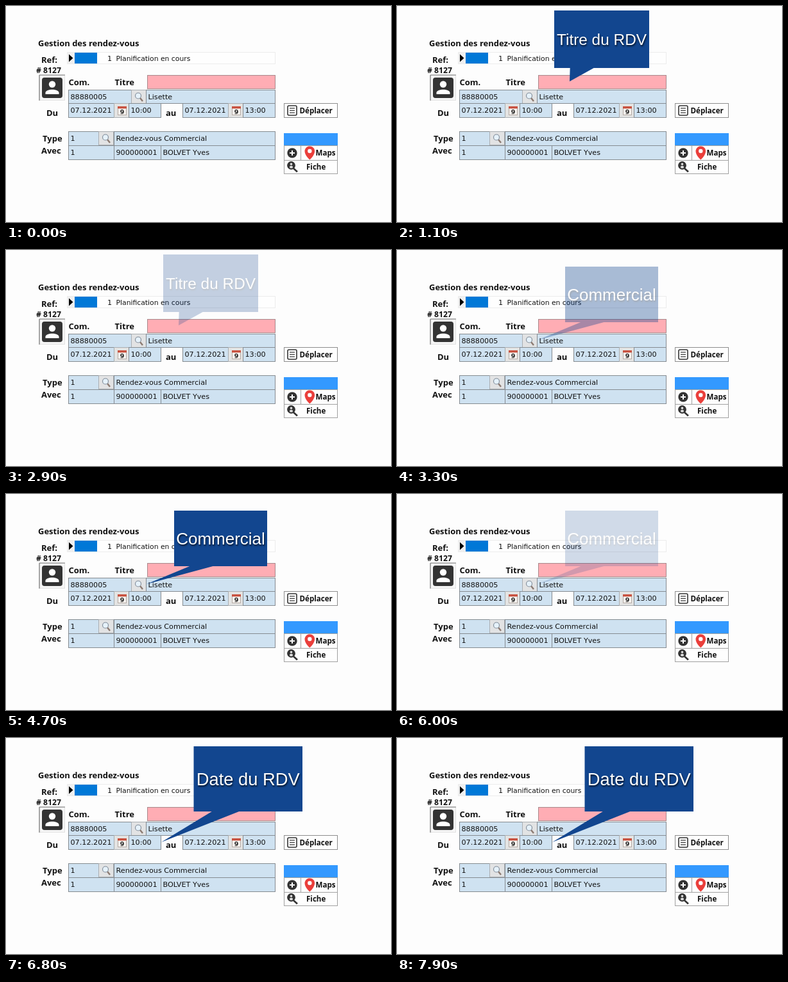
Recreate the animation shown at these times as an HTML page with a canvas. Size 600 by 338 pixels, loop 8000 ms.

```html
<!DOCTYPE html>
<html lang="fr">
<head>
<meta charset="utf-8">
<style>
  html, body { margin: 0; width: 100%; height: 100%; overflow: hidden; background: #fdfdfd; }
  canvas { display: block; }
</style>
</head>
<body>
<canvas id="stage" width="600" height="338"></canvas>
<script>
const W = 600, H = 338, LOOP = 8000, FADE = 700;
const FIELD_FONT = '11.2px "DejaVu Sans", sans-serif';
const LABEL_FONT = 'bold 13px "Open Sans", sans-serif';
const BUTTON_FONT = 'bold 11.6px "Open Sans", sans-serif';
const DARK = '#333333', EDGE = '#858b90', FIELD = '#cfe2f1';

// Each callout: box, pointer tip, text size, start of fade-in and of fade-out.
const callouts = [
  { text: 'Titre du RDV', size: 24.4, box: [245, 7, 148, 90], tip: [269, 118], show: 50, hide: 2370 },
  { text: 'Commercial', size: 26, box: [262, 26, 145, 87], tip: [219, 141], show: 3050, hide: 5430 },
  { text: 'Date du RDV', size: 27.3, box: [292.5, 13, 169.5, 102], tip: [242, 163], show: 6100, hide: LOOP }
];

function layer() {
  const canvas = document.createElement('canvas');
  canvas.width = W;
  canvas.height = H;
  return canvas;
}

function rect(c, x, y, w, h, fill, stroke) {
  c.fillStyle = fill;
  c.fillRect(x, y, w, h);
  if (stroke) {
    c.lineWidth = 1;
    c.strokeStyle = stroke;
    c.strokeRect(x + 0.5, y + 0.5, w - 1, h - 1);
  }
}

function polygon(c, points, fill) {
  c.beginPath();
  points.forEach(([x, y]) => c.lineTo(x, y));
  c.closePath();
  c.fillStyle = fill;
  c.fill();
}

function disc(c, x, y, r, fill) {
  c.beginPath();
  c.arc(x, y, r, 0, Math.PI * 2);
  c.fillStyle = fill;
  c.fill();
}

function line(c, x1, y1, x2, y2, width, color) {
  c.beginPath();
  c.moveTo(x1, y1);
  c.lineTo(x2, y2);
  c.lineWidth = width;
  c.strokeStyle = color;
  c.stroke();
}

function text(c, value, x, y, font = FIELD_FONT, color = '#111') {
  c.font = font;
  c.fillStyle = color;
  c.fillText(value, x, y);
}

function field(c, x, y, w, h, value) {
  rect(c, x, y, w, h, FIELD, EDGE);
  text(c, value, x + 3.5, y + h / 2 + 3.5);
}

function searchButton(c, x, y) {
  rect(c, x, y, 24, 22, '#e2e3e4', '#a9aeb2');
  line(c, x + 14, y + 13, x + 18, y + 18, 2.4, '#8c7a72');
  disc(c, x + 11, y + 9.5, 5, '#7f8b98');
  disc(c, x + 11, y + 9.5, 3.9, '#e6f2fb');
}

function calendarButton(c, x, y) {
  rect(c, x, y, 24, 23, '#e4e4e3', '#a9aeb2');
  rect(c, x + 6, y + 5, 14, 14, '#f6f3ef', '#b4aaa5');
  rect(c, x + 6, y + 5, 14, 3.5, '#c8513f');
  text(c, '9', x + 9.8, y + 17, 'bold 9.5px "DejaVu Sans", sans-serif', '#222');
}

function drawPortrait(c) {
  rect(c, 52, 108, 40, 40, '#f6f6f6', '#e2e2e2');
  line(c, 52, 108, 92, 108, 1.2, '#777');
  line(c, 52, 108, 52, 148, 1.2, '#777');
  c.beginPath();
  c.roundRect(56, 112, 32, 32, 4);
  c.fillStyle = DARK;
  c.fill();
  disc(c, 72, 122.5, 5.2, '#fff');
  c.beginPath();
  c.moveTo(61.5, 138);
  c.lineTo(61.5, 135.5);
  c.bezierCurveTo(62, 129, 82, 129, 82.5, 135.5);
  c.lineTo(82.5, 138);
  c.closePath();
  c.fill();
}

function drawButtons(c) {
  rect(c, 433, 152, 84, 23, '#fefefe', '#8c8c8c');
  c.beginPath();
  c.roundRect(439, 156, 14, 15, 2);
  c.lineWidth = 1.6;
  c.strokeStyle = DARK;
  c.stroke();
  [160, 163.5, 167].forEach(y => line(c, 442, y, 450, y, 1.2, DARK));
  text(c, 'Déplacer', 457.5, 168, BUTTON_FONT);

  rect(c, 433, 199, 84, 20, '#3399ff');
  rect(c, 433, 218, 27, 24, '#fefefe', '#a0a0a0');
  rect(c, 459, 218, 58, 24, '#fefefe', '#a0a0a0');
  rect(c, 433, 241, 84, 22, '#fefefe', '#a0a0a0');

  disc(c, 446, 230, 7.7, DARK);
  line(c, 442, 230, 450, 230, 2, '#fff');
  line(c, 446, 226, 446, 234, 2, '#fff');

  c.beginPath();
  c.arc(473.3, 227.2, 7.8, Math.PI * 0.93, Math.PI * 0.07);
  c.quadraticCurveTo(479.5, 235, 473.3, 240.5);
  c.quadraticCurveTo(467, 235, 465.6, 228.8);
  c.fillStyle = '#ea3f3b';
  c.fill();
  disc(c, 473.3, 227, 3.2, '#fff');
  text(c, 'Maps', 482.5, 234, BUTTON_FONT);

  line(c, 448, 254, 454, 259.5, 2.6, DARK);
  disc(c, 444.5, 249.5, 6.4, DARK);
  disc(c, 444.5, 247.4, 1.8, '#ddd');
  c.beginPath();
  c.ellipse(444.5, 252, 2.6, 2, 0, 0, Math.PI * 2);
  c.fillStyle = '#ddd';
  c.fill();
  text(c, 'Fiche', 468, 256, BUTTON_FONT);
}

function drawForm() {
  const canvas = layer(), c = canvas.getContext('2d');
  rect(c, 0, 0, W, H, '#fdfdfd');

  [['Gestion des rendez-vous', 50, 63], ['Ref:', 55, 88.5], ['Com.', 97.5, 124],
   ['Titre', 169.5, 124], ['Du', 63, 172], ['au', 249, 172],
   ['Type', 57, 212], ['Avec', 55, 231]
  ].forEach(([value, x, y]) => text(c, value, x, y, LABEL_FONT));
  text(c, '# 8127', 47, 105, 'bold 12.2px "Open Sans", sans-serif');

  rect(c, 95, 72, 325, 19, '#fefefe', '#ececec');
  rect(c, 96, 73, 11, 17, '#f0f0f0');
  polygon(c, [[98, 75.5], [104.5, 81.5], [98, 87.5]], '#000');
  rect(c, 107, 73, 35, 17, '#0078d7');
  text(c, '1', 158, 86);
  text(c, 'Planification en cours', 171.5, 86, '10.8px "DejaVu Sans", sans-serif');

  drawPortrait(c);

  rect(c, 220, 108, 200, 22, '#ffadb4', '#a8888b');
  field(c, 97, 131, 99, 22, '88880005');
  searchButton(c, 195, 131);
  field(c, 218, 131, 202, 22, 'Lisette');
  field(c, 97, 152, 72, 23, '07.12.2021');
  calendarButton(c, 168, 152);
  field(c, 191, 152, 51, 23, '10:00');
  field(c, 275, 152, 72, 23, '07.12.2021');
  calendarButton(c, 346, 152);
  field(c, 369, 152, 51, 23, '13:00');

  field(c, 97, 196, 48, 23, '1');
  searchButton(c, 144, 196);
  field(c, 168, 196, 252, 23, 'Rendez-vous Commercial');
  field(c, 97, 218, 72, 23, '1');
  field(c, 168, 218, 74, 23, '900000001');
  field(c, 241, 218, 179, 23, 'BOLVET Yves');

  drawButtons(c);
  return canvas;
}

function drawCallout({ text: label, size, box: [x, y, w, h], tip }) {
  const canvas = layer(), c = canvas.getContext('2d');
  const bottom = y + h;
  polygon(c, [[x, y], [x + w, y], [x + w, bottom], [x + w * 5 / 12, bottom],
    tip, [x + w / 6, bottom], [x, bottom]], '#12468f');
  c.textAlign = 'center';
  c.shadowColor = 'rgba(0,0,0,0.75)';
  c.shadowBlur = 2.5;
  c.shadowOffsetX = 1;
  c.shadowOffsetY = 2;
  text(c, label, x + w / 2, y + h / 2 + size * 0.36,
    `${size}px "Liberation Sans", Arial, sans-serif`, '#fff');
  return canvas;
}

const fade = (t, start) => Math.min(1, Math.max(0, (t - start) / FADE));

const view = document.getElementById('stage').getContext('2d');
const form = drawForm();
const layers = callouts.map(drawCallout);

function render(now) {
  const t = now % LOOP;
  view.globalAlpha = 1;
  view.drawImage(form, 0, 0);
  callouts.forEach(({ show, hide }, i) => {
    view.globalAlpha = fade(t, show) * (1 - fade(t, hide));
    if (view.globalAlpha > 0) view.drawImage(layers[i], 0, 0);
  });
}

const origin = performance.now();
function tick() {
  render(performance.now() - origin);
  requestAnimationFrame(tick);
}
tick();
</script>
</body>
</html>
```
